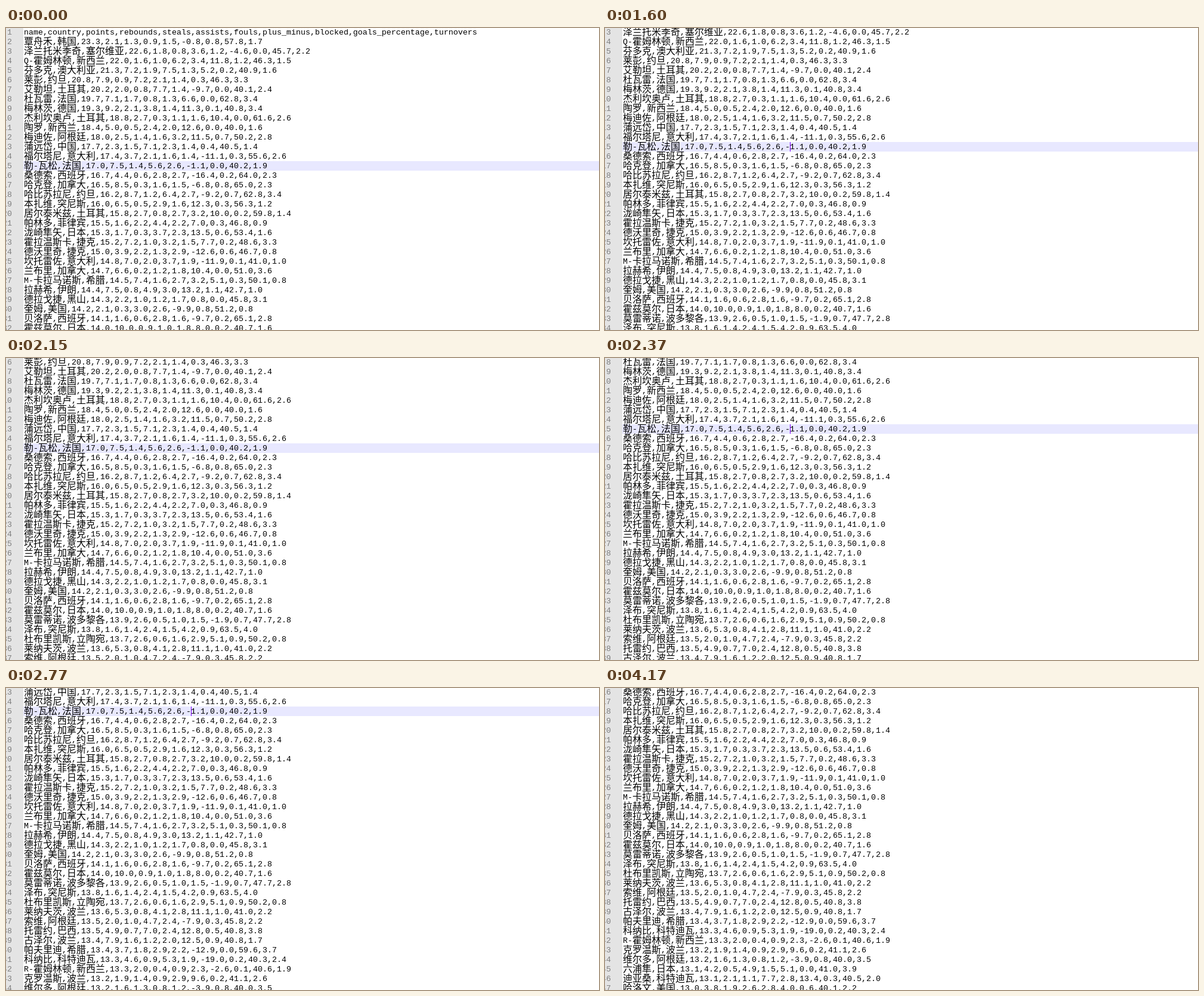
An HTML page for the animation above (4630 ms loop, 994x506 px).

```html
<!DOCTYPE html>
<html lang="zh-CN">
<head>
<meta charset="utf-8">
<title>Player table</title>
<style>
  html, body { margin: 0; width: 100%; height: 100%; overflow: hidden; background: #fff; }
  #stage { position: relative; width: 994px; height: 506px; overflow: hidden; background: #fff; }
  #gutter { position: absolute; left: 0; top: 0; width: 29px; height: 100%; background: #e4e4e4; }
  #page { position: absolute; left: 0; top: -1px; width: 100%; }
  .row {
    position: relative; height: 16px; line-height: 17px; white-space: pre; color: #000;
    font-family: "Liberation Mono", "Courier New", monospace; font-size: 13.3333px;
  }
  .num { position: absolute; right: 984px; top: 0; color: #808080; }
  .txt { position: absolute; left: 29px; right: 0; top: 0; height: 16px; padding-left: 1px; }
  .current .txt { background: #e8e8ff; }
  .han {
    position: relative; top: 1px; line-height: 0; font-size: 16px; font-weight: 300;
    font-family: "Noto Sans CJK SC", "Noto Sans CJK", sans-serif;
  }
  #caret { position: absolute; left: 310px; top: 0; width: 1px; height: 16px; background: #8000ff; }
</style>
</head>
<body>
<div id="stage">
  <div id="gutter"></div>
  <div id="page"></div>
</div>
<script>
const LOOP = 4630, ROW = 16, CURRENT = 15;

const header = "name,country,points,rebounds,steals,assists,fouls,plus_minus,blocked,goals_percentage,turnovers";

const players = `覃舟禾,韩国 泽兰托米季奇,塞尔维亚 Q-霍姆林顿,新西兰 芬多克,澳大利亚 莱彭,约旦
艾勒坦,土耳其 杜瓦雷,法国 梅林茨,德国 杰利坎奥卢,土耳其 陶罗,新西兰
梅迪佐,阿根廷 蒲远岱,中国 福尔塔尼,意大利 勒-瓦松,法国 桑德索,西班牙
哈克登,加拿大 哈比苏拉尼,约旦 本扎维,突尼斯 居尔泰米兹,土耳其 帕林多,菲律宾
泷崎隼矢,日本 霍拉温斯卡,捷克 德沃里奇,捷克 坎托雷佐,意大利 兰布里,加拿大
M-卡拉马诺斯,希腊 拉赫希,伊朗 德拉戈捷,黑山 奎姆,美国 贝洛萨,西班牙
霍兹莫尔,日本 莫雷蒂诺,波多黎各 泽布,突尼斯 杜布里凯斯,立陶宛 莱纳夫茨,波兰
索维,阿根廷 托雷约,巴西 古泽尔,波兰 帕夫里迪,希腊 科纳比,科特迪瓦
R-霍姆林顿,新西兰 克罗温斯,波兰 维尔多,阿根廷 六浦隼,日本 迪亚桑,科特迪瓦
哈洛文,美国`.split(/\s+/);

// Range and skew of each column after points
const columns = {
  rebounds: [1.6, 11, 2],
  steals: [0.2, 2.2, 1.4],
  assists: [0.8, 7.8, 1.8],
  fouls: [1.2, 3.6, 1.3],
  plusMinus: [-22, 14, 0.55],
  blocked: [0, 1.2, 2],
  percentage: [40, 66, 1.8],
  turnovers: [0.8, 4.4, 1.4]
};

let seed = 15;
function random() {
  seed = (seed * 1664525 + 1013904223) % 4294967296;
  return seed / 4294967296;
}

const tenth = v => (Math.round(v * 10) / 10).toFixed(1);

function record(player, rank) {
  const points = 12.5 + 10.8 * Math.exp(-rank / 15);
  const stats = Object.values(columns).map(([lo, hi, skew]) => lo + (hi - lo) * random() ** skew);
  return [player, ...[points, ...stats].map(tenth)].join(",");
}

const page = document.getElementById("page");
page.innerHTML = [header, ...players.map(record)].map((line, i) => {
  const n = i + 1, here = n === CURRENT;
  const text = line.replace(/[\u3400-\u9fff]+/g, '<span class="han">$&</span>');
  return `<div class="row${here ? " current" : ""}"><span class="num">${n}</span>` +
    `<span class="txt">${text}</span>${here ? '<i id="caret"></i>' : ""}</div>`;
}).join("");

// Holds each value until the next step: [time in ms, value]
function play(el, steps, style) {
  const frames = steps.map(([t, v]) => ({ offset: t / LOOP, easing: "step-end", ...style(v) }));
  frames.push({ offset: 1, ...style(steps[steps.length - 1][1]) });
  const anim = el.animate(frames, { duration: LOOP, iterations: Infinity });
  anim.startTime = document.timeline.currentTime;
}

// Slow row-by-row start, then a steady run every 80 ms, then a last jump
const scroll = [[0, 0], [1370, 1], [1600, 2], [1865, 3], [1970, 4], [2150, 5], [2210, 6]];
for (let row = 7; row <= 12; row++) scroll.push([2370 + (row - 7) * 80, row]);
scroll.push([2920, 14], [2990, 15]);

play(page, scroll, v => ({ transform: `translateY(${-v * ROW}px)` }));
play(document.getElementById("caret"), [[0, 0], [1200, 1], [1760, 0], [2370, 1], [2920, 0]],
  v => ({ opacity: v }));
</script>
</body>
</html>
```
